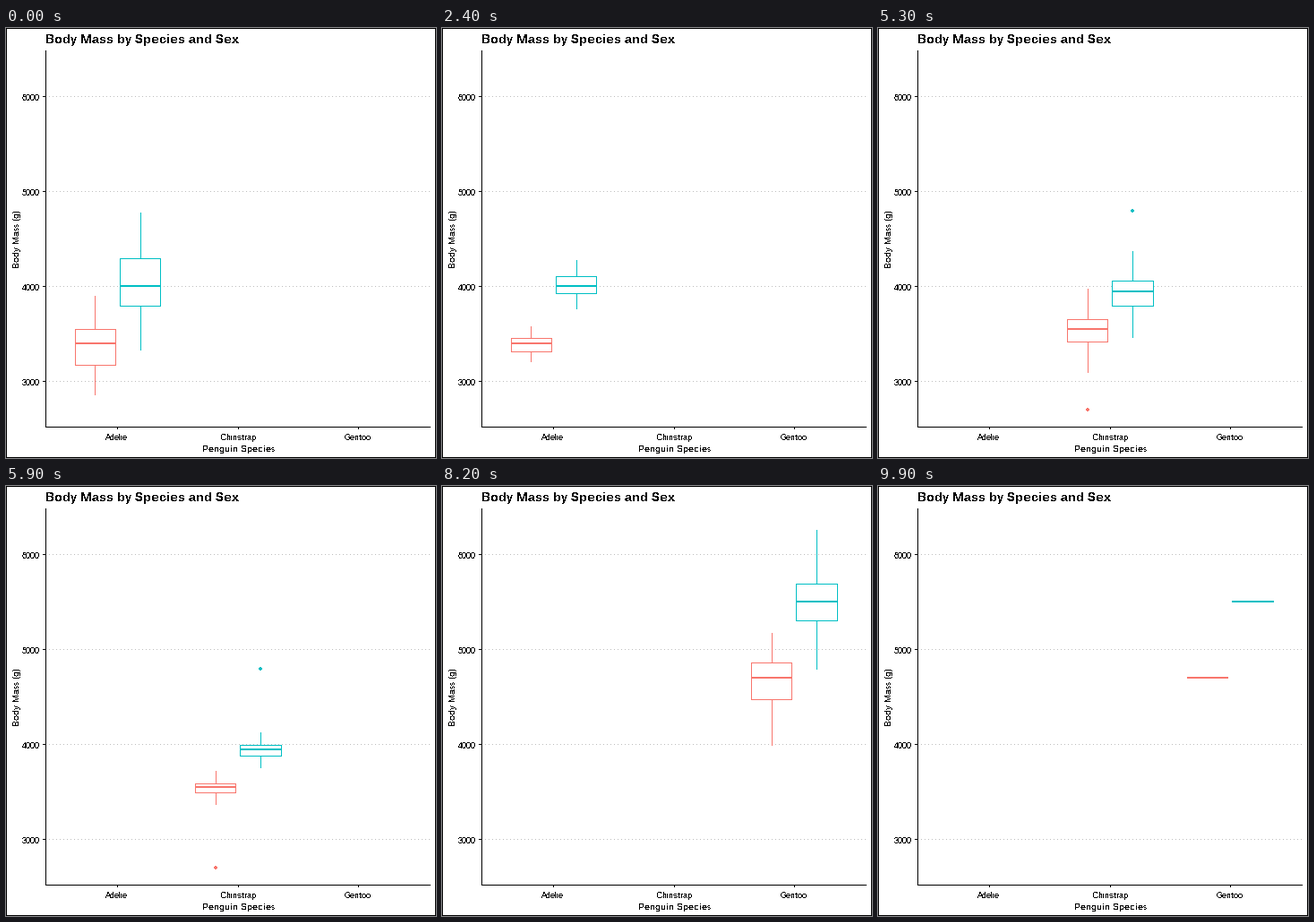
These frames come from a looping animation (480x480 px, 10000 ms). A matplotlib script:

```python
import math

import matplotlib.pyplot as plt
from matplotlib.animation import FuncAnimation
from matplotlib.patches import Rectangle

SIZE, DPI = 480, 72  # at 72 dpi a point is a pixel
FRAMES, INTERVAL = 100, 100
RED, TEAL, GREY = "#F8766D", "#00BFC4", "#BEBEBE"
LEFT, RIGHT, TOP, BOTTOM = 44, 473, 25, 445
FIRST_X, STEP_X = 124.6, 134.15

# Per group: low whisker, quartiles, high whisker, then an optional outlier.
# Each species is (first frame, last full frame, end frame, female, male).
SPECIES = [
    (0, 11, 33,
     (2850, 3175, 3400, 3550, 3900),
     (3325, 3800, 4000, 4300, 4775)),
    (33, 45, 67,
     (2900, 3362.5, 3550, 3693.75, 4150, 2700),
     (3250, 3731.25, 3950, 4100, 4550, 4800)),
    (67, 79, 100,
     (3950, 4462.5, 4700, 4875, 5200),
     (4750, 5300, 5500, 5700, 6300)),
]

plt.rcParams.update({
    "font.family": "Liberation Sans",
    "text.hinting": "native",
    "text.hinting_factor": 1,
    "text.antialiased": False,
})

fig = plt.figure(figsize=(SIZE / DPI, SIZE / DPI), dpi=DPI, facecolor="white")
ax = fig.add_axes([0, 0, 1, 1])
ax.set_xlim(0, SIZE)
ax.set_ylim(SIZE, 0)
ax.axis("off")


def bar(x0, y0, x1, y1, color, z=1):
    """Fill the pixels from (x0, y0) to (x1, y1), both included."""
    if x1 < x0 or y1 < y0:
        return []
    patch = Rectangle((x0, y0), x1 - x0 + 1, y1 - y0 + 1, facecolor=color,
                      edgecolor="none", linewidth=0, antialiased=False, zorder=z)
    return [ax.add_patch(patch)]


def label(x, y, text, size, **style):
    ax.text(x, y, text, fontsize=size, color="black", ha="left",
            va="baseline", **style)


def row(mass):
    y = BOTTOM - (mass - 2520) * (BOTTOM - TOP) / 3960
    return math.floor(y + 0.92)


def draw_chart():
    for i in range(4):
        y = 394 - 106 * i
        for x in range(LEFT, RIGHT + 1, 4):
            bar(x, y, x, y, GREY)
        bar(LEFT - 3, y, LEFT - 1, y, "black")
        label(18, y + 5, str(3000 + 1000 * i), 9)

    bar(LEFT, TOP, LEFT, BOTTOM, "black")
    bar(LEFT, BOTTOM, RIGHT, BOTTOM, "black")
    for tick, x, name in ((124, 111, "Adelie"), (259, 239, "Chinstrap"),
                          (393, 378, "Gentoo")):
        bar(tick, BOTTOM + 1, tick, BOTTOM + 2, "black")
        label(x, 460, name, 9)

    label(44, 17, "Body Mass by Species and Sex", 14, weight="bold")
    label(219, 473, "Penguin Species", 10)
    label(15, 268, "Body Mass (g)", 10, rotation=90, rotation_mode="anchor")

    last = SIZE - 1
    for edge in ((0, 0, last, 0), (0, last, last, last),
                 (0, 0, 0, last), (last, 0, last, last)):
        bar(*edge, "black")


def draw_box(center, stats, scale, color):
    """One box plot, squeezed towards its median by scale."""
    median = stats[2]
    low, q1, mid, q3, high = (row(median + (v - median) * scale)
                              for v in stats[:5])
    half = 0.16875 * STEP_X
    x0, x1 = round(center - half), round(center + half)
    x = round(center)
    parts = bar(x, high, x, q3, color, 3)
    parts += bar(x, q1, x, low - 1, color, 3)
    parts += bar(x0, q3, x1, q1, color, 4)
    parts += bar(x0 + 1, q3 + 1, x1 - 1, q1 - 1, "white", 5)
    parts += bar(x0, mid - 1, x1, mid, color, 6)
    for mass in stats[5:]:
        y = row(mass)
        parts += bar(x - 2, y - 1, x + 1, y, color, 6)
        parts += bar(x - 1, y - 2, x, y + 1, color, 6)
    return parts


shown = []


def draw(frame):
    while shown:
        shown.pop().remove()
    for i, (start, hold, end, female, male) in enumerate(SPECIES):
        if start <= frame < end:
            t = max(0, frame - hold) / (end - hold)
            scale = (1 + math.cos(math.pi * t)) / 2
            center = FIRST_X + STEP_X * i
            shift = 0.1875 * STEP_X
            shown.extend(draw_box(center - shift, female, scale, RED))
            shown.extend(draw_box(center + shift, male, scale, TEAL))
    return shown


draw_chart()
anim = FuncAnimation(fig, draw, frames=FRAMES, interval=INTERVAL,
                     repeat=True, repeat_delay=0, blit=False)
plt.show()
```
